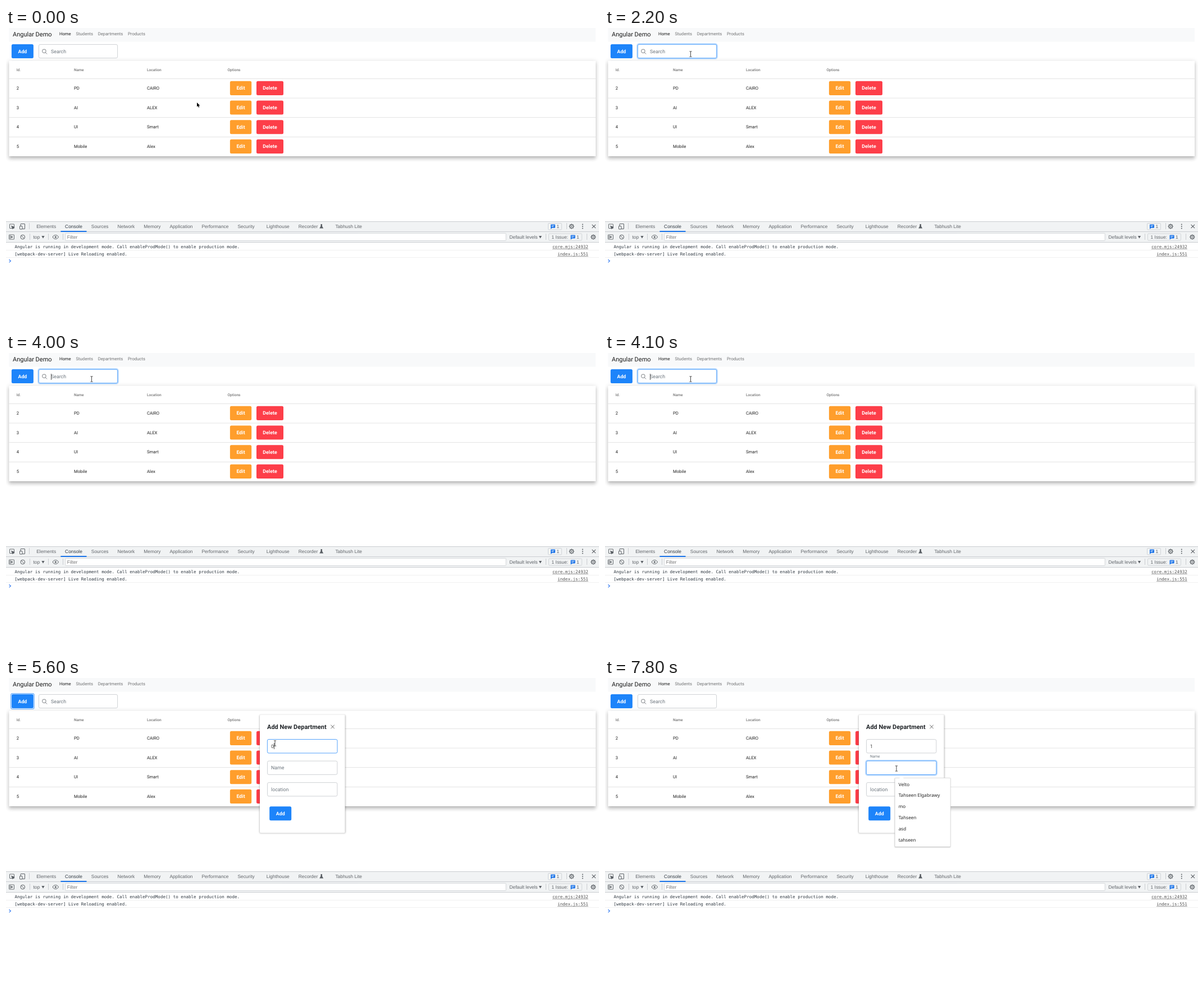
Animation, 1056 px wide and 530 px high, one loop 8 s. Source, as an HTML page with a canvas:

```html
<!DOCTYPE html>
<html lang="en">
<head>
<meta charset="utf-8">
<title>Department list</title>
<style>
  html, body { margin: 0; width: 100%; height: 100%; overflow: hidden; background: #fff; }
  canvas { display: block; }
</style>
</head>
<body>
<canvas id="stage" width="1056" height="530"></canvas>
<script>
const ctx = document.getElementById('stage').getContext('2d');
ctx.textRendering = 'geometricPrecision';
const LOOP = 8000, STEP = 100;
const UI = 'Roboto, sans-serif';
const TOOLS = '"Liberation Sans", Arial, sans-serif';
const MONO = '"DejaVu Sans Mono", monospace';
const MENU = '"Noto Sans", sans-serif';
const BLUE = '#1d84fa', ORANGE = '#ff9e2c', RED = '#fd3e49';
const INK = '#212121', GRAY = '#6c757d', ICON = '#5a5f64', LINE = '#cacdd1';

const DEPARTMENTS = [
  ['2', 'PD', 'CAIRO'], ['3', 'AI', 'ALEX'], ['4', 'UI', 'Smart'], ['5', 'Mobile', 'Alex']
];
const SUGGESTIONS = ['Velto', 'Tahseen Elgabrawy', 'mo', 'Tahseen', 'asd', 'tahseen'];

const box = (x, y, w, h) => ({ x, y, w, h });
const grow = (b, d) => box(b.x - d, b.y - d, b.w + 2 * d, b.h + 2 * d);
const SEARCH = box(57.9, 28.9, 141.2, 25.2);
const ADD = box(9.9, 29, 39, 25.1);
const FIELDS = [0, 1, 2].map(i => box(465, 109.1 + i * 38.5, 125.4, 25.3));

// pointer glides, each starting where the last one ended
const HOME = { x: 340, y: 133 };
const MOVES = [
  { from: 100, to: 800, x: 152.5, y: 46.5 },
  { from: 4500, to: 4800, x: 36, y: 42 },
  { from: 4900, to: 5200, x: 460, y: 113 },
  { from: 5400, to: 5500, x: 479, y: 116.5 },
  { from: 6300, to: 6700, x: 510, y: 197 },
  { from: 6900, to: 7000, x: 513, y: 173 },
  { from: 7100, to: 7200, x: 519, y: 161.5 }
];

const clamp = v => Math.max(0, Math.min(1, v));
const mix = (a, b, k) => a + (b - a) * k;
const ramp = (t, from, length = 200) => clamp((t - from) / length);
const pulse = (t, on, off) => ramp(t, on) * (1 - ramp(t, off));
const during = (t, a, b) => t >= a && t < b;
const inside = (p, b) => p.x >= b.x && p.x <= b.x + b.w && p.y >= b.y && p.y <= b.y + b.h;

function pointerAt(t) {
  return MOVES.reduce((p, m) => {
    const k = Math.sin(ramp(t, m.from, m.to - m.from) * Math.PI / 2);
    return { x: mix(p.x, m.x, k), y: mix(p.y, m.y, k) };
  }, HOME);
}

function text(str, x, cy, size, color = INK, { font = UI, weight = 400, align = 'left' } = {}) {
  ctx.font = `${weight} ${size}px ${font}`;
  ctx.textAlign = align;
  ctx.fillStyle = color;
  ctx.fillText(str, x, cy + size * 0.355);
  return ctx.measureText(str).width;
}

function rect(x, y, w, h, color) {
  ctx.fillStyle = color;
  ctx.fillRect(x, y, w, h);
}

function round(b, r, fill, stroke, width = 1) {
  ctx.beginPath();
  ctx.roundRect(b.x, b.y, b.w, b.h, r);
  if (fill) { ctx.fillStyle = fill; ctx.fill(); }
  if (stroke) { ctx.strokeStyle = stroke; ctx.lineWidth = width; ctx.stroke(); }
}

// The caster sits off stage so that only its shadow shows.
function shadow(b, dy, blur, spread, alpha) {
  const away = 3000, g = grow(b, spread);
  ctx.save();
  ctx.shadowColor = `rgba(0,0,0,${alpha})`;
  ctx.shadowOffsetX = away;
  ctx.shadowOffsetY = dy;
  ctx.shadowBlur = blur;
  rect(g.x - away, g.y, g.w, g.h, '#000');
  ctx.restore();
}

function trace(points, close) {
  ctx.beginPath();
  points.forEach(([x, y]) => ctx.lineTo(x, y));
  if (close) ctx.closePath();
}

function line(points, color = ICON, width = 1, close = false) {
  trace(points, close);
  ctx.strokeStyle = color;
  ctx.lineWidth = width;
  ctx.stroke();
}

function shape(points, color = ICON) {
  trace(points);
  ctx.fillStyle = color;
  ctx.fill();
}

function oval(x, y, rx, ry, color, width) {
  ctx.beginPath();
  ctx.ellipse(x, y, rx, ry, 0, 0, 7);
  if (width) { ctx.strokeStyle = color; ctx.lineWidth = width; ctx.stroke(); }
  else { ctx.fillStyle = color; ctx.fill(); }
}

const circle = (x, y, r, color, width) => oval(x, y, r, r, color, width);
const caret = (x, y) => rect(x, y, 1, 11, '#555');

function cross(x, y, r, color, width) {
  line([[x - r, y - r], [x + r, y + r]], color, width);
  line([[x - r, y + r], [x + r, y - r]], color, width);
}

function button(b, label, color) {
  round(b, 2.5, color);
  text(label, b.x + b.w / 2, b.y + b.h / 2 - 0.1, 8.8, '#fff', { weight: 700, align: 'center' });
}

function field(b, hover, focus) {
  if (focus) round(grow(b, 0.8), 3.5, null, `rgba(29,132,250,${0.3 * focus})`, 1.7);
  if (hover || focus) round(grow(b, -0.4), 2.5, '#fff', BLUE, 0.75);
  else round(grow(b, -0.5), 2.5, '#fff', '#cfd2d5');
}

function navbar() {
  rect(5.4, 0, 1044.6, 24.5, '#f8f9fa');
  text('Angular Demo', 12, 10.6, 11, '#1a1a1a');
  let x = 95;
  ['Home', 'Students', 'Departments', 'Products'].forEach((name, i) => {
    x += text(name, x, 10.6, 7.7, i ? '#727374' : '#1a1a1a') + 8.8;
  });
}

function searchBar(t, hover) {
  const ring = pulse(t, 4800, 5600);
  if (ring) round(grow(ADD, 1.4), 3.5, null, `rgba(29,132,250,${0.7 * ring})`, 1.1);
  button(ADD, 'Add', BLUE);
  field(SEARCH, hover, pulse(t, 1600, 4800));
  circle(67.9, 41.2, 3.3, ICON, 0.8);
  line([[70.2, 43.6], [73, 46.5]], ICON, 0.8);

  const typed = during(t, 2800, 3800) ? 'PD' : during(t, 3800, 4000) ? 'P' : '';
  text(typed || 'Search', 80, 41.6, 8.8, typed ? '#333' : GRAY);
  if (during(t, 1600, 2200) || during(t, 4000, 4600)) caret(80, 37);
  if (during(t, 2800, 3400)) caret(91, 36);
}

function table(filtered) {
  const rows = filtered ? DEPARTMENTS.slice(0, 1) : DEPARTMENTS;
  const cols = filtered ? [18.7, 124.6, 225.8, 374] : [18.7, 121, 251, 394.5];
  const top = 58.5, head = 31.8, high = 34.65;
  const card = box(5.4, top, 1044.8, head + high * rows.length);
  shadow(card, 2.75, 2.75, -1.65, 0.2);
  shadow(card, 4.4, 5.5, 0.55, 0.14);
  shadow(card, 1.65, 7.7, 1.1, 0.12);
  rect(card.x, card.y, card.w, card.h, '#fff');

  ['Id.', 'Name', 'Location', 'Options'].forEach((h, i) =>
    text(h, cols[i], 74.2, 6.6, '#757575', { weight: 500 }));
  rows.forEach((row, i) => {
    const y = top + head + i * high, mid = y + high / 2 - 0.3;
    rect(card.x, y - 0.3, card.w, 0.8, '#dcdcdc');
    row.forEach((cell, j) => text(cell, cols[j], mid, 7.7));
    button(box(cols[3] + 4.4, mid - 12.5, 38.3, 25.1), 'Edit', ORANGE);
    button(box(cols[3] + 51.5, mid - 12.5, 48, 25.1), 'Delete', RED);
  });
}

function dialog(t, hovers) {
  ctx.globalAlpha = ramp(t, 4900);
  const card = box(452, 65.6, 151.6, 211);
  shadow(card, 0.5, 3, 0, 0.4);
  round(card, 2, '#fff');
  text('Add New Department', 465, 87, 11, '#212529', { weight: 700 });
  cross(581.6, 87, 3.2, '#555', 0.9);

  const lift = ramp(t, 7200);
  const focus = [pulse(t, 5600, 7200), lift, 0];
  FIELDS.forEach((b, i) => field(b, hovers[i], focus[i]));
  text(t < 6300 ? '0' : '1', 472, 121.5, 8.8, '#444');
  text('Name', 472, mix(160, 139.9, lift), mix(8.8, 6.6, lift), GRAY);
  text('location', 472, 198.6, 8.8, GRAY);
  if (during(t, 5600, 7200)) caret(477, 116);
  if (during(t, 7300, 7800)) caret(472, 154);
  button(box(469.2, 229.2, 39, 25.1), 'Add', BLUE);
  ctx.globalAlpha = 1;
}

function suggestions() {
  const card = box(516.2, 178.5, 99, 122.6);
  shadow(card, 0.5, 2, 0, 0.3);
  round(card, 1.5, '#fff', '#d4d4d4', 0.6);
  shape([[524, 179], [528, 175.5], [532, 179]], '#fff');
  SUGGESTIONS.forEach((s, i) =>
    text(s, 522.7, 189.7 + i * 19.8, 8.2, '#222', { font: MENU }));
}

function gear(x, y) {
  circle(x, y, 3.1, ICON, 1.1);
  circle(x, y, 1.1, ICON, 0.8);
  for (let i = 0; i < 8; i++) {
    const c = Math.cos(i * Math.PI / 4), s = Math.sin(i * Math.PI / 4);
    line([[x + 3 * c, y + 3 * s], [x + 4.6 * c, y + 4.6 * s]], ICON, 1.4);
  }
}

function bubble(x, y) {
  round(box(x, y, 8, 6.2), 0.8, '#1a73e8');
  shape([[x, y + 5], [x + 3, y + 6], [x, y + 8.2]], '#1a73e8');
  rect(x + 1.6, y + 1.7, 4.8, 0.8, '#fff');
  rect(x + 1.6, y + 3.6, 3.4, 0.8, '#fff');
}

const drop = (x, y) => shape([[x - 2.6, y - 2], [x + 2.6, y - 2], [x, y + 2.4]]);
const label = (s, x, y, color = '#5f6368') => text(s, x, y, 8.4, color, { font: TOOLS });
const divider = (x, y) => rect(x, y, 1, 11, LINE);

function tabStrip() {
  const mid = 354;
  round(box(6.5, 350, 8, 7.5), 0.5, null, ICON, 0.9);
  shape([[9, 352.5], [15.5, 355], [11.5, 359.2]]);
  round(box(26, 349.5, 7.5, 9), 0.5, null, ICON);
  round(box(24.5, 353.5, 4.5, 5.5), 0.5, '#f1f3f4', ICON);
  divider(41, 348);

  const tabs = (x, names) => names.forEach(name => {
    const active = name === 'Console';
    const w = label(name, x, mid, active ? '#303942' : undefined);
    if (active) rect(x - 7.7, 362, w + 15.4, 2, '#1a73e8');
    x += w + 16;
  });
  tabs(54.2, ['Elements', 'Console', 'Sources', 'Network', 'Memory',
    'Application', 'Performance', 'Security']);
  tabs(463.8, ['Lighthouse', 'Recorder']);
  tabs(586.4, ['Tabhush Lite']);
  rect(560.5, 350, 2.5, 4, ICON);
  shape([[561.7, 351.5], [565.2, 357.5], [558.2, 357.5]]);

  round(box(965.5, 348.5, 24, 11.5), 1.5, null, LINE, 0.8);
  bubble(970, 350.6);
  label('1', 980.4, mid + 0.2);
  divider(998, 348);
  gear(1007.2, mid);
  for (let d = -1; d <= 1; d++) circle(1026.8, mid + 3.4 * d, 1, ICON);
  cross(1046.8, mid, 3.2, ICON, 1.1);
}

function filterRow() {
  const mid = 373;
  round(box(5.5, 369, 9, 8), 0.5, null, ICON, 0.9);
  shape([[9, 370.8], [12.6, mid], [9, 375.2]]);
  rect(7, 370, 1, 6, ICON);
  circle(29.8, mid, 3.8, ICON, 1);
  line([[27.2, 370.3], [32.4, 375.7]]);
  [42, 75, 101, 961, 1034].forEach(x => divider(x, 367));
  label('top', 48.4, mid);
  drop(66, mid);
  oval(88.3, mid, 4.9, 3.4, ICON, 1);
  circle(88.3, mid, 1.6, ICON);
  round(box(105.7, 366.3, 784.6, 13.2), 1, '#fff', LINE, 0.8);
  label('Filter', 108.8, mid, '#757575');
  label('Default levels', 896.5, mid);
  drop(951.5, mid);
  round(box(966.5, 367, 59, 12), 1.5, null, LINE, 0.8);
  label('1 Issue:', 971.6, mid + 0.2);
  bubble(1005.6, 369.4);
  label('1', 1016, mid + 0.2);
  gear(1045.8, mid);
}

function logLine(msg, link, y) {
  const right = 1036.8;
  text(msg, 15.4, y, 7.57, '#303942', { font: MONO });
  const w = text(link, right, y, 7.57, '#545454', { font: MONO, align: 'right' });
  rect(right - w, y + 3.7, w, 0.6, '#545454');
  rect(0, Math.round(y + 6), 1056, 1, '#f0f0f0');
}

function devtools() {
  rect(0, 345, 1056, 38, '#f1f3f4');
  [345, 363, 382].forEach(y => rect(0, y, 1056, 1, LINE));
  tabStrip();
  filterRow();
  logLine('Angular is running in development mode. Call enableProdMode() to enable production mode.',
    'core.mjs:24932', 390.2);
  logLine('[webpack-dev-server] Live Reloading enabled.', 'index.js:551', 403.4);
  line([[5.6, 413.2], [8.4, 415.8], [5.6, 418.4]], '#367cf1', 1.2);
}

function pointer(p, kind) {
  ctx.save();
  ctx.translate(p.x, p.y);
  ctx.lineJoin = 'round';
  if (kind === 'text') {
    line([[0, -4.5], [0, 4.5]], '#333', 0.9);
    [-4.7, 4.7].forEach(y => line([[-2.2, y], [2.2, y]], '#333', 0.8));
  } else if (kind === 'hand') {
    round(box(-2.5, 3, 7, 6.5), 2, '#fff', '#111', 0.7);
    round(box(-1, -1, 1.7, 7), 0.8, '#fff', '#111', 0.7);
  } else {
    const arrow = [[0, 0], [0, 7.6], [1.8, 6], [3, 8.8], [4.3, 8.2], [3.1, 5.6], [5.5, 5.4]];
    line(arrow, '#fff', 1.2, true);
    shape(arrow, '#000');
  }
  ctx.restore();
}

function draw(t) {
  const open = t > 4900;
  const p = pointerAt(t), last = pointerAt(t - STEP);
  const inputs = open ? [SEARCH, ...FIELDS] : [SEARCH];
  const kind = inputs.some(b => inside(p, b)) ? 'text' : inside(p, ADD) ? 'hand' : 'arrow';

  rect(0, 0, 1056, 530, '#fff');
  navbar();
  table(during(t, 2800, 4000));
  searchBar(t, inside(last, SEARCH));
  if (open) dialog(t, FIELDS.map(b => inside(last, b)));
  devtools();
  if (t >= 7400) suggestions();
  pointer(p, kind);
}

const start = performance.now();
function tick() {
  const t = (performance.now() - start) % LOOP;
  draw(Math.floor(t / STEP) * STEP);
  requestAnimationFrame(tick);
}
tick();
</script>
</body>
</html>
```
